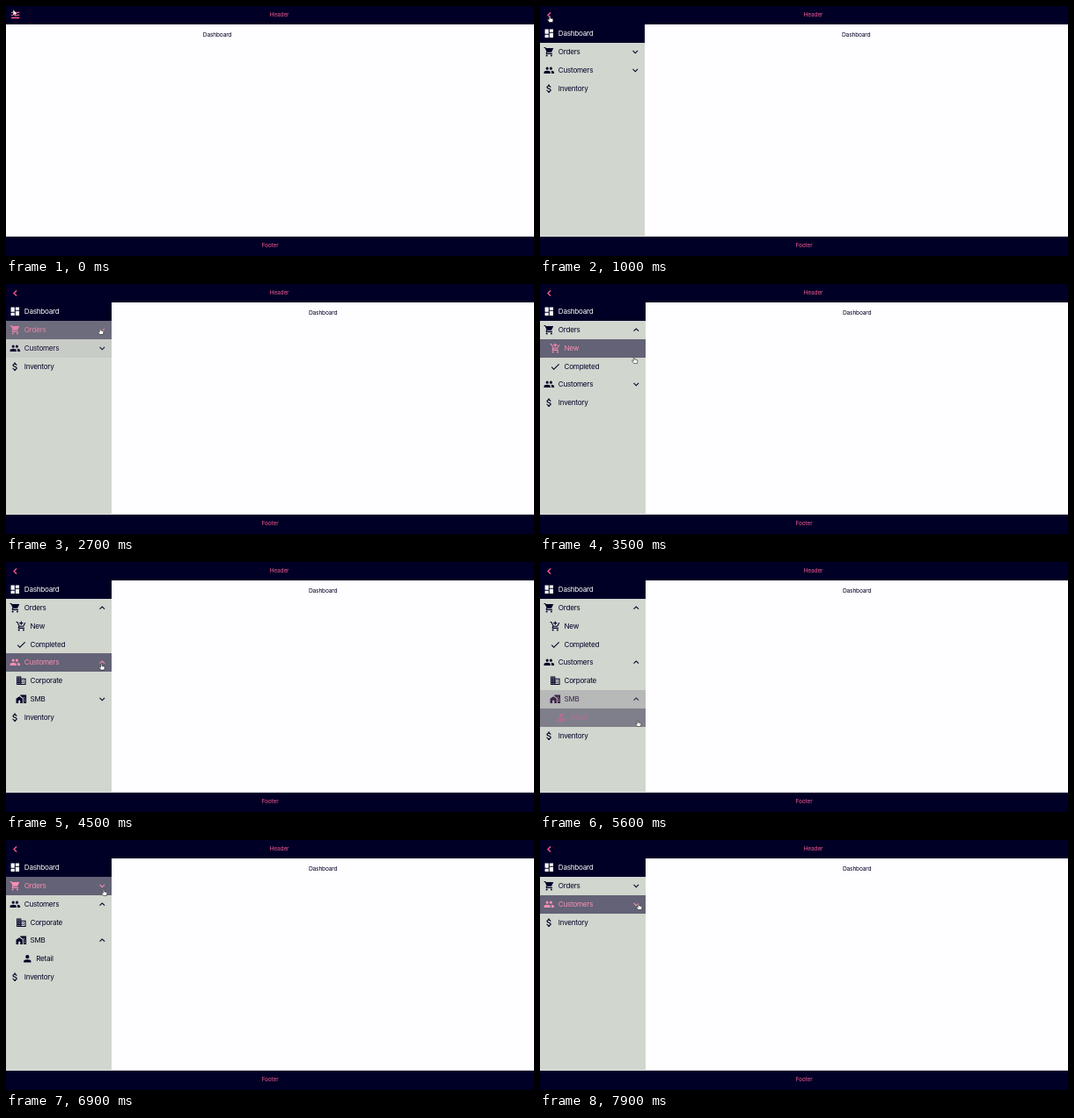
Animation of 600x285 px, one loop 8000 ms. Source, as an HTML page:

```html
<!DOCTYPE html>
<html lang="en">
<head>
<meta charset="utf-8">
<title>Sidebar navigation</title>
<style>
  html, body { margin: 0; width: 100%; height: 100%; overflow: hidden; background: #fefdff; }
  body { position: relative; font: 500 6.7px Inter, "Liberation Sans", sans-serif; letter-spacing: -.035em; color: #000026; white-space: nowrap; }
  div, svg { position: absolute; }
  svg { fill: currentColor; fill-rule: evenodd; overflow: visible; }
  .bar { left: 0; width: 600px; background: #000026; color: #e8588f; text-align: center; font-weight: 400; }
  #header { top: 0; height: 21px; line-height: 21.5px; text-indent: 21px; }
  #footer { top: 263px; height: 22px; line-height: 21px; box-shadow: 0 -1px 1px #d8d8dc; }
  #title { top: 28px; width: 480px; line-height: 11px; text-align: center; font-weight: 400; }
  #sidebar { left: 0; top: 21px; height: 242px; background: #d1d6ce; overflow: hidden; }
  .row { left: 0; width: 100%; overflow: hidden; font-size: 8.1px; line-height: 20.2px; font-weight: 400; }
  .row span { position: absolute; top: 0; }
  .row svg { width: 12.6px; height: 12.6px; top: 4.1px; }
  .row .arrow { right: 4.2px; }
  #menu, #back { left: 0; top: 0; fill: none; stroke: #ff5a92; stroke-width: 1.3; }
  #cursor { left: 0; top: 0; fill: #fff; stroke: #222; stroke-width: .6; stroke-linejoin: round; }
</style>
</head>
<body>
<div id="title">Dashboard</div>
<div id="sidebar"></div>
<div id="header" class="bar">Header</div>
<div id="footer" class="bar">Footer</div>
<svg id="menu" width="21" height="21"><path d="M6 7.3h9.3M6 10.4h9.3M6 13.5h9.3"/></svg>
<svg id="back" width="21" height="21"><path d="M12 7.5l-3 3 3 3"/></svg>
<svg id="cursor" width="8" height="10">
  <path id="pointer" d="M0 0v7l1.7-1.5 1.1 2.5 1.2-.5-1.1-2.4h2.2z"/>
  <path id="hand" d="M-.7 .5q.7-1 1.4 0V3l2.6.6q.7.3.6 1.3L3.4 7.5H-.5L-2.4 4.8q0-1 1-.6l.7.6z"/>
</svg>
<script>
const LOOP = 8000, ROW = 20.85, TOP = 21, SIDEBAR_WIDTH = 120.2;
const OPEN_AT = 480, OPEN_TIME = 550, COLLAPSE_TIME = 280, FADE_TIME = 200;
const BASE = [209, 214, 206], HOVER = [99, 98, 118], INK = [0, 0, 38], PINK = [247, 143, 178];

const disc = (x, y, r) => `M${x - r} ${y}a${r} ${r} 0 1 0 ${2 * r} 0a${r} ${r} 0 1 0 ${-2 * r} 0z`;
const wheels = disc(7, 20, 2) + disc(17, 20, 2);
const icons = {
  grid: 'M3 13h8V3H3zM3 21h8v-6H3zM13 21h8V11h-8zM13 3v6h8V3z',
  cart: 'M1 2v2h2l3.6 7.6-1.4 2.4q-.9 3 1.8 3h12v-2H7.4l1-2h7.5q1.2 0 1.8-1L21.5 4H5.2l-.9-2z' + wheels,
  cartAdd: 'M1 2v2h2l3.6 7.6-1.4 2.4q-.9 3 1.8 3h12v-2H7.4l1-2h7.5q1.2 0 1.8-1l3.9-7-1.8-1-3.9 7H8.5L4.3 2zM11 9h2V6h3V4h-3V1h-2v3H8v2h3z' + wheels,
  check: 'M9 16.2L4.8 12l-1.4 1.4L9 19 21 7l-1.4-1.4z',
  people: disc(8, 8, 3) + disc(16, 8, 3) + 'M1 19v-2.5q0-3.5 7-3.5t7 3.5V19zM17 19h6v-2.5q0-3-6.5-3.5 1.5 1.5 .5 6z',
  office: 'M2 3h10v4h10v14H2zM4 5v2h2V5zm0 4v2h2V9zm0 4v2h2v-2zm0 4v2h2v-2zM8 5v2h2V5zm0 4v2h2V9zm0 4v2h2v-2zm0 4v2h2v-2zM12 9v2h2v2h-2v2h2v2h-2v2h8V9zM16 11h2v2h-2zm0 4h2v2h-2z',
  homes: 'M1 11v10h5v-6h4v6h5V11L8 6zM10 3v2l7 5v11h6V3zm7 4h2v2h-2zm2 4h2v2h-2zm0 4h2v2h-2z',
  person: disc(12, 8, 4) + 'M4 20v-2q0-4 8-4t8 4v2z',
  dollar: 'M11.8 10.9c-2.3-.6-3-1.2-3-2.1 0-1.1 1-1.8 2.7-1.8 1.8 0 2.4.9 2.5 2.1h2.2c-.1-1.7-1.1-3.3-3.2-3.8V3h-3v2.2C8 5.6 6.5 6.8 6.5 8.8c0 2.3 1.9 3.5 4.7 4.1 2.5.6 3 1.5 3 2.4 0 .7-.5 1.8-2.7 1.8-2 0-2.9-.9-3-2.1H6.3c.1 2.2 1.8 3.4 3.7 3.8V21h3v-2.2c2-.4 3.5-1.5 3.5-3.6 0-2.8-2.4-3.8-4.7-4.3z',
  arrow: 'M16.6 8.6L12 13.2 7.4 8.6 6 10l6 6 6-6z'
};

// Groups carry the times at which they are opened and closed.
const tree = [
  { label: 'Dashboard', icon: 'grid', selected: true },
  { label: 'Orders', icon: 'cart', open: 2850, close: 6220, children: [
    { label: 'New', icon: 'cartAdd' },
    { label: 'Completed', icon: 'check' }] },
  { label: 'Customers', icon: 'people', open: 4150, close: 7560, children: [
    { label: 'Corporate', icon: 'office' },
    { label: 'SMB', icon: 'homes', open: 4980, close: LOOP, children: [
      { label: 'Retail', icon: 'person' }] }] },
  { label: 'Inventory', icon: 'dollar' }
];

// Cursor stops: time, x, y
const stops = [
  [0, 8, 4], [100, 8, 4], [250, 10, 9], [400, 11, 11], [1250, 11, 11],
  [1950, 55, 98], [2200, 55, 98], [2700, 107, 50], [3050, 107, 50],
  [3500, 107, 83], [3950, 108, 110], [4400, 108, 110], [4850, 110, 153],
  [5300, 110, 153], [5600, 111, 180], [5720, 111, 180], [6150, 111, 56],
  [6900, 111, 56], [7350, 112, 72], [LOOP, 112, 72]
];

const byId = id => document.getElementById(id);
const clamp = (v, lo = 0, hi = 1) => Math.min(hi, Math.max(lo, v));
const smooth = v => { const p = clamp(v); return p * p * (3 - 2 * p); };
const mix = (a, b, p) => `rgb(${a.map((v, i) => v + (b[i] - v) * p)})`;
const iconSvg = (name, attrs = '') => `<svg viewBox="0 0 24 24" ${attrs}><path d="${icons[name]}"/></svg>`;

function build(items, depth = 0) {
  for (const item of items) {
    const el = item.el = document.createElement('div');
    const indent = depth * 6.7;
    el.className = 'row';
    el.innerHTML = iconSvg(item.icon, `style="left:${4.2 + indent}px"`) +
      `<span style="left:${20.8 + indent}px">${item.label}</span>` +
      (item.children ? iconSvg('arrow', 'class="arrow"') : '');
    byId('sidebar').append(el);
    if (item.children) build(item.children, depth + 1);
  }
}

function layout(t) {
  const rows = [];
  const place = (items, y) => {
    for (const item of items) {
      rows.push({ item, top: y, height: ROW });
      y += ROW;
      if (!item.children) continue;
      const first = rows.length;
      const full = place(item.children, y) - y;
      const openness = smooth((t - item.open) / COLLAPSE_TIME) - smooth((t - item.close) / COLLAPSE_TIME);
      const bottom = y + full * openness;
      for (const row of rows.slice(first)) row.height = clamp(bottom - row.top, 0, row.height);
      y = bottom;
    }
    return y;
  };
  place(tree, 0);
  return rows;
}

function cursorAt(t) {
  const i = Math.max(1, stops.findIndex(s => s[0] >= t));
  const [t0, x0, y0] = stops[i - 1], [t1, x1, y1] = stops[i];
  const p = smooth((t - t0) / (t1 - t0));
  return [x0 + (x1 - x0) * p, y0 + (y1 - y0) * p];
}

function hoveredAt(t) {
  const y = cursorAt(t)[1] - TOP;
  return layout(t).find(r => y >= r.top && y < r.top + r.height)?.item;
}

// Each row's fade is the share of the last moments the cursor spent over it.
function hoverShares(t, samples = 12) {
  const shares = new Map();
  for (let i = 0; i < samples; i++) {
    const item = hoveredAt(Math.max(0, t - i * FADE_TIME / samples));
    shares.set(item, (shares.get(item) || 0) + 1 / samples);
  }
  return shares;
}

function render(t) {
  const open = smooth((t - OPEN_AT) / OPEN_TIME);
  byId('sidebar').style.width = SIDEBAR_WIDTH * open + 'px';
  byId('title').style.left = SIDEBAR_WIDTH * open + 'px';
  byId('menu').style.display = t < OPEN_AT ? '' : 'none';
  byId('back').style.display = t < OPEN_AT ? 'none' : '';

  const shares = hoverShares(t);
  for (const { item, top, height } of layout(t)) {
    const { style } = item.el, hover = shares.get(item) || 0;
    style.top = top + 'px';
    style.height = height + 'px';
    style.background = item.selected ? '#000026' : mix(BASE, HOVER, hover);
    style.color = item.selected ? '#fff' : mix(INK, PINK, hover);
    if (item.children) {
      const expanded = t >= item.open && t < item.close;
      item.el.querySelector('.arrow').style.transform = expanded ? 'rotate(180deg)' : '';
    }
  }

  const [x, y] = cursorAt(t);
  byId('cursor').style.transform = `translate(${x}px, ${y}px)`;
  byId('pointer').style.display = t < 200 ? '' : 'none';
  byId('hand').style.display = t < 200 ? 'none' : '';
}

build(tree);
const start = performance.now();
function tick() {
  render((performance.now() - start) % LOOP);
  requestAnimationFrame(tick);
}
tick();
</script>
</body>
</html>
```
